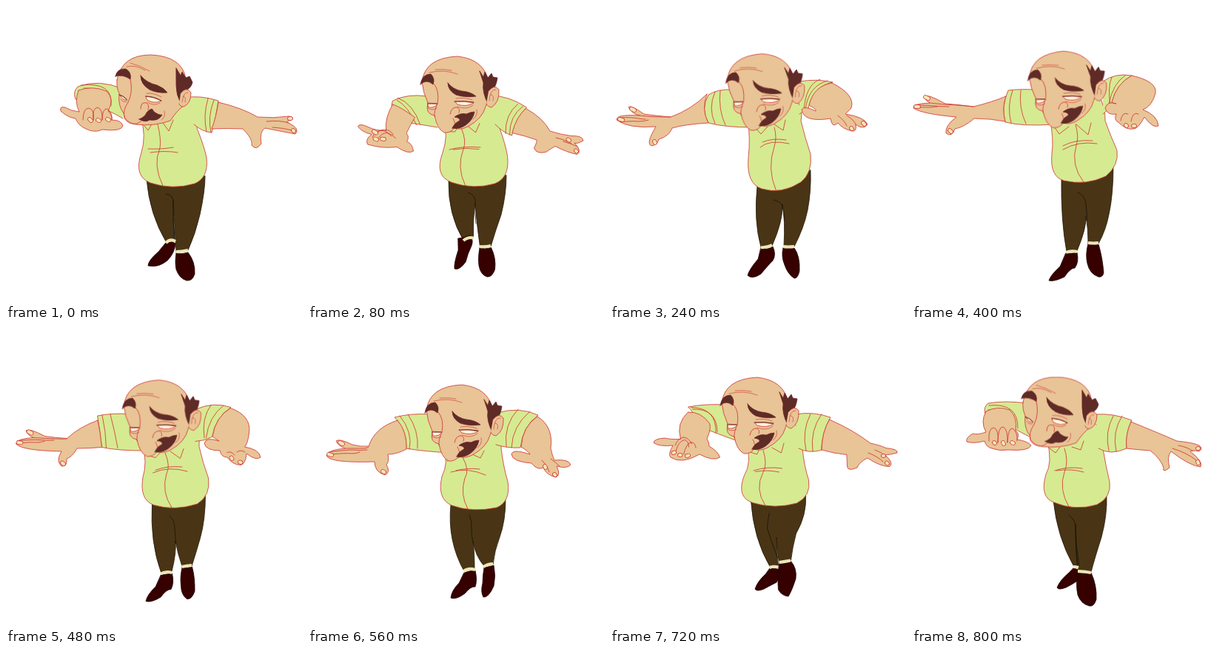
Write an HTML page without scripts that moves like this. It is 400 by 400 pixels and loops after 880 ms.

```html
<!DOCTYPE html>
<html lang="en">
<head>
<meta charset="utf-8">
<title>Dancing man</title>
<style>
html, body { margin: 0; height: 100%; overflow: hidden; background: #fff }
svg { display: block; width: 100vw; height: 100vh }
path { fill: none; stroke: #d03030; stroke-width: .8; stroke-linejoin: round; stroke-linecap: round }
.skin { fill: #e8c496 }
.shirt { fill: #d6ea92 }
.hair { fill: #5e2b27; stroke: #6d2424 }
.eye { fill: #fff3dc }
.lid { stroke: #602a29; stroke-width: 1 }
.thin { stroke-width: .6 }
.pants { fill: #493515; stroke: #22180a }
.seam { stroke: #17120a }
.sock { stroke: #ece6b4; stroke-width: 4; stroke-linecap: butt }
.shoe { fill: #360000; stroke: #1c0000 }
.rim { stroke-width: 5.6 }
.nail { stroke: #f5e5b6; stroke-width: 4.2 }

/* Poses are 80 or 160 ms apart; two steps give the long gaps one in-between. */
.move { animation: .88s steps(2) infinite }
#legs { animation-name: legs }
#seam { animation-name: seam }
#socks { animation-name: socks }
#shoeL { animation-name: shoe-l }
#shoeR { animation-name: shoe-r }
#torso { animation-name: torso }
#folds { animation-name: folds }
#sleeveL { animation-name: sleeve-l }
#sleeveR { animation-name: sleeve-r }
#cuffs { animation-name: cuffs }
#armL { animation-name: arm-l }
#armR { animation-name: arm-r }
#knuckles { animation-name: knuckles }
.nails { animation-name: nails }
#front { animation-name: front, front-shown; transform-origin: 208px 125px }
#side { animation-name: side, side-shown }

@keyframes legs {
0%, to { d: path("M190,234Q194,282 217,320L228,316Q226,280 226,262Q228,300 230,332L246,330Q256,308 262,282Q269,250 269,230Z") }
18.18% { d: path("M190,238Q184,282 204,315L219,308Q220,290 226,272Q229,298 235,319L248,320Q251,298 260,282Q267,258 267,228Z"); animation-timing-function: step-end }
27.27% { d: path("M199,243Q194,290 204,326L219,324Q234,290 233,268Q237,290 235,324L249,325Q262,300 267,276Q272,250 271,222Z") }
45.45% { d: path("M202,230Q201,290 209,332L223,331Q236,300 235,284Q238,300 238,320L252,321Q262,303 266,282Q272,255 272,214Z") }
63.63% { d: path("M193,236Q188,285 211,326L225,322Q225,300 223,286Q226,305 238,319L250,317Q252,298 259,280Q267,258 267,228Z"); animation-timing-function: step-end }
72.72% { d: path("M190,232Q192,285 214,321L229,318Q229,305 229,298Q231,300 233,301L247,295Q246,280 247,270Q268,250 266,222Z") }
90.9% { d: path("M191,230Q196,280 219,320L226,319Q221,290 221,262Q221,300 224,327L242,327Q247,308 256,280Q264,250 263,224Z"); animation-timing-function: step-end }
}
@keyframes seam {
0%, to { d: path("M216,254Q226,255 226,264Q225,290 228,316") }
18.18% { d: path("M217,250Q224,256 226,260Q226,268 226,272"); animation-timing-function: step-end }
27.27% { d: path("M221,262Q230,264 233,270Q235,280 236,290") }
45.45% { d: path("M224,252Q234,256 235,268Q237,280 236,290") }
63.63% { d: path("M218,250Q222,258 221,268Q221,280 223,287"); animation-timing-function: step-end }
72.72% { d: path("M218,245Q204,260 204,268Q216,286 229,298") }
90.9% { d: path("M212,250Q222,258 221,268Q221,290 224,318"); animation-timing-function: step-end }
}
@keyframes socks {
0%, to { d: path("M216,320Q222,314 229,318M230,332Q238,332 246,330") }
18.18% { d: path("M204,314Q210,309 219,309M234,318Q241,320 248,318"); animation-timing-function: step-end }
27.27% { d: path("M204,326Q211,327 219,323M234,325Q241,326 249,325") }
45.45% { d: path("M208,333Q215,330 223,332M238,320Q245,321 252,320") }
63.63% { d: path("M210,326Q217,321 226,324M237,320Q243,316 250,316"); animation-timing-function: step-end }
72.72% { d: path("M213,322Q221,318 229,320M233,302Q239,300 246,295") }
90.9% { d: path("M218,320Q222,320 225,321M224,326Q233,326 242,328"); animation-timing-function: step-end }
}
@keyframes shoe-l {
0%, to { d: path("M216,320Q224,316 229,321Q228,334 218,344Q206,354 192,351Q192,344 206,332Z") }
18.18% { d: path("M203,314Q212,313 219,310Q224,316 221,324Q216,334 213,346Q204,358 198,355Q197,348 203,330Z"); animation-timing-function: step-end }
27.27% { d: path("M204,327Q214,330 220,325Q225,336 220,344Q214,350 204,362Q192,370 186,364Q188,356 200,342Z") }
45.45% { d: path("M208,334Q216,335 223,333Q226,346 220,354Q214,354 206,366Q192,373 185,371Q187,364 200,352Z") }
63.63% { d: path("M211,328Q218,325 226,325Q229,338 226,347Q220,346 212,356Q200,365 193,362Q194,352 204,342Z"); animation-timing-function: step-end }
72.72% { d: path("M214,322Q222,321 230,322Q233,336 228,342Q220,345 208,352Q198,356 196,352Q198,342 208,332Z") }
90.9% { d: path("M219,321Q222,323 224,324Q226,334 222,340Q216,344 208,348Q198,352 196,348Q200,338 212,328Z"); animation-timing-function: step-end }
}
@keyframes shoe-r {
0%, to { d: path("M230,334Q238,336 246,333Q256,346 255,362Q252,372 244,371Q234,368 230,356Q228,346 230,334Z") }
18.18% { d: path("M234,320Q241,322 249,320Q253,336 250,350Q246,361 240,361Q232,358 232,346Q231,334 234,320Z"); animation-timing-function: step-end }
27.27% { d: path("M234,327Q242,328 249,327Q257,338 256,358Q254,368 249,368Q240,362 236,350Q231,338 234,327Z") }
45.45% { d: path("M238,321Q246,324 252,322Q257,338 259,360Q258,367 252,366Q240,362 237,348Q234,336 238,321Z") }
63.63% { d: path("M238,321Q244,320 251,318Q254,332 251,346Q244,362 237,361Q233,354 236,342Q236,332 238,321Z"); animation-timing-function: step-end }
72.72% { d: path("M233,303Q240,302 247,297Q256,300 253,308Q246,330 242,347Q236,348 231,344Q231,325 233,303Z") }
90.9% { d: path("M224,328Q234,330 242,328Q250,345 249,364Q246,374 240,373Q228,370 224,358Q221,344 224,328Z"); animation-timing-function: step-end }
}
@keyframes torso {
0%, to { d: path("M182,150Q190,175 183,198Q172,230 195,239Q225,249 255,240Q274,232 271,205Q268,190 258,165Q262,140 245,128Z") }
18.18% { d: path("M184,160Q190,175 181,198Q168,230 194,238Q222,248 250,240Q272,232 268,200Q266,185 260,165Q264,140 250,122Z"); animation-timing-function: step-end }
27.27% { d: path("M186,150Q190,180 187,205Q184,240 205,247Q232,255 258,238Q274,225 271,200Q264,180 258,155Q262,140 250,122Z") }
45.45% { d: path("M186,150Q192,180 189,200Q186,230 205,236Q235,243 262,230Q280,215 277,195Q268,175 261,155Q262,140 252,118Z") }
63.63% { d: path("M184,160Q190,180 181,198Q174,228 194,237Q222,247 255,240Q274,232 270,205Q264,185 261,160Q264,140 252,122Z"); animation-timing-function: step-end }
72.72% { d: path("M186,150Q194,180 182,198Q168,226 194,234Q225,240 255,232Q274,222 270,200Q263,185 262,160Q264,140 248,122Z") }
90.9% { d: path("M183,150Q190,180 181,195Q172,226 192,233Q220,245 250,236Q270,226 267,205Q262,185 258,160Q262,140 244,122Z"); animation-timing-function: step-end }
}
@keyframes folds {
0%, to { d: path("M205,160Q210,180 208,192Q198,215 212,243M192,193Q210,194 226,191M195,198Q215,195 232,198M212,158L220,169L226,154M187,162L192,168L198,158") }
18.18% { d: path("M210,172Q219,185 212,195Q203,220 213,242M190,195Q210,184 240,191M197,190Q212,187 230,189M222,168L233,173L238,163M188,177L205,172L211,162"); animation-timing-function: step-end }
27.27% { d: path("M222,164Q226,178 222,190Q212,220 224,248M203,191Q215,180 242,186M206,184Q220,178 238,181M222,160L234,168L237,154M194,162L204,173L213,163") }
45.45% { d: path("M221,160Q226,178 222,188Q214,215 232,238M204,194Q225,182 250,186M204,189Q220,180 244,182M222,160L238,174L242,158M190,160L199,173L212,163") }
63.63% { d: path("M209,172Q219,190 212,200Q205,222 216,242M193,192Q215,185 240,196M200,190Q215,186 232,188M222,168L233,173L238,163M188,177L205,172L211,162"); animation-timing-function: step-end }
72.72% { d: path("M208,165Q214,185 208,192Q192,215 208,236M195,190Q215,184 235,187M198,193Q210,190 225,192M222,160L235,170L238,156M190,169L203,170L207,158") }
90.9% { d: path("M206,160Q212,178 206,192Q198,215 212,239M193,190Q210,184 230,187M195,190Q215,187 232,192M216,158L228,162L232,150M186,160L194,166L200,158"); animation-timing-function: step-end }
}
@keyframes sleeve-l {
0%, to { d: path("M158,112Q125,98 97,109Q90,116 94,126Q140,140 158,152") }
18.18% { d: path("M164,132Q145,138 132,147Q128,160 152,186Q165,180 192,176"); animation-timing-function: step-end }
27.27% { d: path("M166,113Q145,112 133,120Q122,140 133,158Q155,164 192,164") }
45.45% { d: path("M166,113Q145,112 130,114Q120,136 126,157Q150,163 192,160") }
63.63% { d: path("M166,114Q140,112 117,118Q134,135 133,160Q155,164 192,166"); animation-timing-function: step-end }
72.72% { d: path("M162,103Q130,104 108,109Q130,115 138,145Q155,148 192,158") }
90.9% { d: path("M156,99Q125,95 103,99Q96,104 99,114Q142,135 158,144"); animation-timing-function: step-end }
}
@keyframes sleeve-r {
0%, to { d: path("M242,124Q262,120 287,128Q284,150 278,171Q265,170 254,160") }
18.18% { d: path("M252,118Q280,122 304,146Q278,150 273,179Q262,172 252,160"); animation-timing-function: step-end }
27.27% { d: path("M256,102Q280,98 301,103Q275,108 268,138Q262,142 256,146") }
45.45% { d: path("M258,102Q275,90 297,94Q276,105 270,130Q266,140 258,146") }
63.63% { d: path("M256,112Q285,103 311,115Q290,130 287,159Q270,160 254,155"); animation-timing-function: step-end }
72.72% { d: path("M252,114Q275,107 299,114Q285,135 281,165Q268,164 258,160") }
90.9% { d: path("M248,114Q272,112 297,122Q288,140 290,160Q268,170 252,160"); animation-timing-function: step-end }
}
@keyframes cuffs {
0%, to { d: path("M101,107Q146,102 142,135M105,111Q138,110 137,135M273,125Q266,148 271,170M281,127Q272,150 277,171") }
18.18% { d: path("M141,141Q138,162 161,185M136,144Q132,160 156,186M294,140Q266,146 263,175M300,144Q272,148 268,177"); animation-timing-function: step-end }
27.27% { d: path("M142,116Q132,138 142,159M149,114Q146,140 156,161M284,99Q264,106 262,142M294,101Q268,108 264,140") }
45.45% { d: path("M136,114Q128,136 134,158M147,114Q144,138 154,159M270,96Q264,110 268,134M288,94Q272,104 266,132") }
63.63% { d: path("M124,116Q142,138 137,161M135,114Q150,136 148,160M284,107Q264,128 268,158M300,110Q276,130 275,159"); animation-timing-function: step-end }
72.72% { d: path("M115,107Q145,112 143,145M120,106Q152,110 150,146M270,111Q258,135 264,163M288,111Q270,135 272,164") }
90.9% { d: path("M104,102Q144,98 143,133M103,108Q138,102 140,130M272,116Q260,138 266,163M284,116Q270,138 276,164"); animation-timing-function: step-end }
}
@keyframes arm-l {
0%, to { d: path("M98,114Q92,130 99,143Q88,142 80,137Q72,135 74,142Q84,151 94,152Q98,162 108,166Q120,172 130,167Q156,170 158,162Q156,154 143,154Q144,148 138,142Q147,126 136,115Q116,107 98,114") }
18.18% { d: path("M131,152Q115,172 112,194Q95,195 85,191Q66,180 61,184Q62,190 78,195Q56,198 53,208Q80,214 110,214Q116,232 127,230Q126,218 124,212Q131,206 128,202Q130,195 153,186Q133,165 131,152"); animation-timing-function: step-end }
27.27% { d: path("M131,119Q110,140 82,150Q60,148 46,146Q26,132 25,137Q30,146 40,148Q8,146 9,154Q25,166 62,163Q48,186 56,189Q64,188 66,180Q80,176 84,165Q100,160 133,158Q123,140 131,119") }
45.45% { d: path("M127,122Q108,130 83,136Q60,133 45,132Q20,118 16,122Q18,128 24,131Q0,132 2,138Q14,146 60,150Q44,162 46,172Q54,178 58,166Q70,164 84,152Q105,152 126,156Q121,138 127,122") }
63.63% { d: path("M121,122Q90,132 82,157Q70,158 60,155Q42,146 38,150Q40,156 50,160Q26,162 25,170Q30,180 90,178Q90,192 104,196Q112,192 106,182Q110,178 108,168Q120,168 133,161Q134,137 121,122"); animation-timing-function: step-end }
72.72% { d: path("M111,112Q86,128 91,157Q75,154 66,152Q46,148 44,154Q50,162 72,162Q56,178 56,184Q75,200 112,174Q122,192 136,188Q136,178 126,166Q122,162 122,158Q130,152 138,146Q132,118 111,112") }
90.9% { d: path("M100,110Q92,124 100,138Q88,142 82,140Q72,146 74,151Q84,154 98,150Q100,158 108,160Q118,164 130,162Q158,164 161,156Q156,150 142,148Q146,140 140,136Q143,118 132,108Q115,102 100,110"); animation-timing-function: step-end }
}
@keyframes arm-r {
0%, to { d: path("M287,130Q320,138 340,150Q362,152 382,149Q390,150 386,154Q376,156 382,158Q398,166 391,173Q375,170 350,165Q342,170 345,186Q338,196 332,188Q334,180 320,166Q300,165 278,166Q284,150 287,130") }
18.18% { d: path("M302,147Q316,165 314,188Q322,196 330,202Q352,200 358,210Q350,218 338,212Q344,226 336,228Q326,226 318,214Q310,218 300,208Q280,206 279,196Q286,186 298,196Q284,185 274,177Q278,150 302,147"); animation-timing-function: step-end }
27.27% { d: path("M300,104Q332,120 326,138Q320,144 318,146Q344,150 348,160Q342,168 332,160Q334,170 327,169Q314,166 308,158Q300,166 298,152Q262,158 259,140Q262,134 278,142Q280,140 269,134Q275,108 300,104") }
45.45% { d: path("M297,94Q332,102 329,118Q324,136 312,140Q332,148 333,162Q326,166 314,150Q306,166 299,166Q290,168 280,158Q272,154 276,146Q264,148 261,138Q264,128 276,132Q272,132 270,130Q276,105 297,94") }
63.63% { d: path("M310,117Q332,130 328,160Q330,170 333,176Q352,174 355,182Q350,188 336,184Q342,196 335,199Q322,196 318,186Q310,190 302,180Q276,178 275,168Q276,160 300,168Q298,164 288,158Q290,130 310,117"); animation-timing-function: step-end }
72.72% { d: path("M297,118Q322,130 346,156Q352,160 358,163Q386,162 388,168Q384,174 368,174Q374,182 366,184Q356,186 346,182Q330,184 320,186Q302,190 301,180Q304,174 318,174Q300,172 282,164Q285,135 297,118") }
90.9% { d: path("M296,124Q335,140 358,150Q380,152 388,156Q394,160 388,164Q378,162 376,164Q394,178 390,185Q376,184 350,164Q344,172 348,186Q338,194 340,186Q336,174 322,163Q306,162 290,160Q288,140 296,124"); animation-timing-function: step-end }
}
@keyframes knuckles {
0%, to { d: path("M104,154Q104,138 112,138Q120,140 118,154M118,154Q116,138 124,137Q131,140 130,154M130,154Q130,138 137,139Q144,144 143,154M352,156Q370,154 382,158M360,164Q376,165 386,168") }
18.18% { d: path("M78,195Q88,196 95,196Q104,195 112,194M56,201Q66,198 76,199Q84,198 95,198M58,206Q70,204 76,204Q85,204 94,203M318,200Q326,208 330,214M330,202Q338,208 342,212"); animation-timing-function: step-end }
27.27% { d: path("M40,148Q55,150 70,150Q78,150 82,150M12,151Q30,150 38,152Q44,153 48,153M14,157Q30,155 38,156Q46,156 52,154M308,148Q318,156 320,162M320,148Q330,154 332,160") }
45.45% { d: path("M24,131Q40,133 60,134Q75,135 83,136M4,134Q20,134 30,135Q40,136 50,136M6,138Q14,136 24,137Q30,136 34,136M282,155Q284,142 292,146M296,156Q298,142 306,146") }
63.63% { d: path("M50,160Q65,160 75,160Q80,160 82,158M28,165Q50,162 60,162Q70,163 80,162M32,168Q50,166 60,167Q66,167 70,165M316,176Q324,184 326,192M328,174Q336,180 340,184"); animation-timing-function: step-end }
72.72% { d: path("M72,162Q80,160 88,158Q95,157 105,156M62,176Q68,170 78,166Q82,164 84,164M70,184Q76,174 84,170Q88,168 90,168M346,172Q352,176 354,180M356,168Q362,172 366,178") }
90.9% { d: path("M104,150Q103,133 110,132Q118,134 116,152M116,152Q116,131 123,131Q130,134 129,152M129,152Q130,132 136,133Q143,138 142,150M352,160Q372,166 384,176M360,156Q372,158 380,164"); animation-timing-function: step-end }
}
@keyframes nails {
0%, to { d: path("M113,153L115,155M124,154L126,155M137,153L139,154M383,152L385,152M388,168L389,169") }
18.18% { d: path("M65,186L69,188M57,205L60,206M63,206L67,206M320,209L321,211M336,223L337,224"); animation-timing-function: step-end }
27.27% { d: path("M29,139L33,141M13,153L17,154M60,183L61,185M326,165L327,166M342,158L344,160") }
45.45% { d: path("M18,123L22,125M5,136L9,136M51,168L53,170M289,161L290,162M299,162L301,162") }
63.63% { d: path("M43,152L47,154M28,168L32,169M101,191L103,192M320,184L321,186M333,195L334,196"); animation-timing-function: step-end }
72.72% { d: path("M60,180L62,178M65,186L67,184M73,188L75,186M352,180L353,180M362,181L363,181") }
90.9% { d: path("M111,152L112,153M123,152L124,154M135,152L137,153M386,160L387,160M386,178L387,180"); animation-timing-function: step-end }
}
@keyframes front {
0%, to { transform: translate(-12px, -12px) }
18.18% { transform: none; animation-timing-function: step-end }
27.27% { transform: translate(-1px, -9.5px) rotate(-2deg) }
45.45% { transform: translate(-1px, -13px) rotate(-2deg) }
63.63% { transform: none; animation-timing-function: step-end }
72.72% { transform: translate(-6px, -8px) }
90.9% { transform: translate(-12px, -12px); animation-timing-function: step-end }
}
@keyframes side {
0%, to { transform: none; animation-timing-function: step-end }
90.9% { transform: translate(0, -2.5px); animation-timing-function: step-end }
}
@keyframes front-shown {
0%, 90.9%, to { visibility: hidden; animation-timing-function: step-end }
9.09% { visibility: visible; animation-timing-function: step-end }
}
@keyframes side-shown {
0%, 90.9%, to { visibility: visible; animation-timing-function: step-end }
9.09% { visibility: hidden; animation-timing-function: step-end }
}
</style>
</head>
<body>
<svg viewBox="0 0 400 400">
  <path id="legs" class="move pants"/>
  <path id="seam" class="move seam"/>
  <path id="shoeL" class="move shoe"/>
  <path id="shoeR" class="move shoe"/>
  <path id="socks" class="move sock"/>
  <path id="torso" class="move shirt"/>
  <path id="folds" class="move"/>
  <path id="sleeveL" class="move shirt"/>
  <path id="sleeveR" class="move shirt"/>
  <path id="cuffs" class="move"/>
  <path id="armL" class="move skin"/>
  <path id="armR" class="move skin"/>
  <path id="knuckles" class="move"/>
  <path class="move nails rim"/>
  <path class="move nails nail"/>

  <g id="front" class="move">
    <path class="skin" d="M160,108Q164,76 208,74Q244,78 250,108Q252,130 246,142Q242,158 222,169Q212,174 204,171Q198,178 190,177Q180,172 177,154Q164,152 168,137Q161,122 160,108Z"/>
    <path class="hair" d="M238,94L243,102L245,95L249,103L254,97L256,102L262,103Q260,116 255,119Q249,126 249,138Q241,122 243,110Z"/>
    <path class="skin" d="M250,121Q258,111 264,119Q265,136 254,143Q248,142 247,138"/>
    <path class="thin" d="M251,134Q252,118 260,119M253,126Q258,126 256,134M170,96Q190,91 208,98M178,92Q190,91 200,93M234,146Q236,154 229,159"/>
    <path d="M176,111Q184,120 181,138Q176,148 177,156M204,171Q206,164 202,158M198,152Q200,142 208,143Q212,146 210,150"/>
    <path class="eye" d="M168,137L181,138Q178,144 169,143ZM205,135Q218,134 230,137Q220,143 208,139Z"/>
    <path class="lid" d="M168,138L180,138M204,135Q218,134 230,136"/>
    <path class="thin" d="M168,144Q174,148 180,144M208,142Q220,147 229,140M206,131Q218,129 228,133"/>
    <path class="hair" d="M158,112Q160,98 172,98Q178,104 175,112Q166,104 158,112ZM195,110Q202,119 214,121Q226,122 233,128Q218,130 206,126Q195,120 195,110ZM201,171Q204,164 211,161Q212,157 204,156Q212,150 220,152Q226,149 231,149Q229,160 219,167Q210,173 201,171Z"/>
  </g>

  <g id="side" class="move">
    <path class="skin" d="M150,100Q156,66 196,66Q238,68 243,98L240,135Q232,140 222,155Q200,163 175,160Q160,157 159,145Q151,135 153,118Q149,110 150,100Z"/>
    <path class="hair" d="M230,84L236,94L238,89L243,97L248,95L252,103Q250,112 242,114Q236,120 236,131Q230,120 230,108Z"/>
    <path class="skin" d="M236,118Q244,108 250,117Q250,132 240,136Q235,136 234,132"/>
    <path class="thin" d="M238,130Q240,115 246,117M239,122Q244,122 242,130M163,82Q175,79 188,87M168,77Q180,80 194,88M214,142Q216,150 210,154"/>
    <path d="M168,99Q172,116 165,130Q157,142 160,152Q166,161 177,159Q187,154 190,144M182,139Q182,129 190,131Q194,134 192,140"/>
    <path class="eye" d="M154,120Q158,121 164,127Q157,128 154,120ZM189,122Q200,123 210,128Q200,133 191,127Z"/>
    <path class="lid" d="M153,120Q158,121 163,126M189,122Q200,122 210,128"/>
    <path class="thin" d="M155,126Q159,131 163,129M191,130Q200,136 208,131M190,118Q200,117 210,123"/>
    <path class="hair" d="M148,95Q150,84 162,85Q170,90 168,99Q158,92 148,95ZM182,94Q190,104 204,107Q214,111 218,117Q204,118 194,113Q182,106 182,94ZM180,153Q188,150 191,143Q198,136 199,142Q206,148 211,147Q206,156 194,154Q188,158 180,153Z"/>
  </g>
</svg>
</body>
</html>
```
